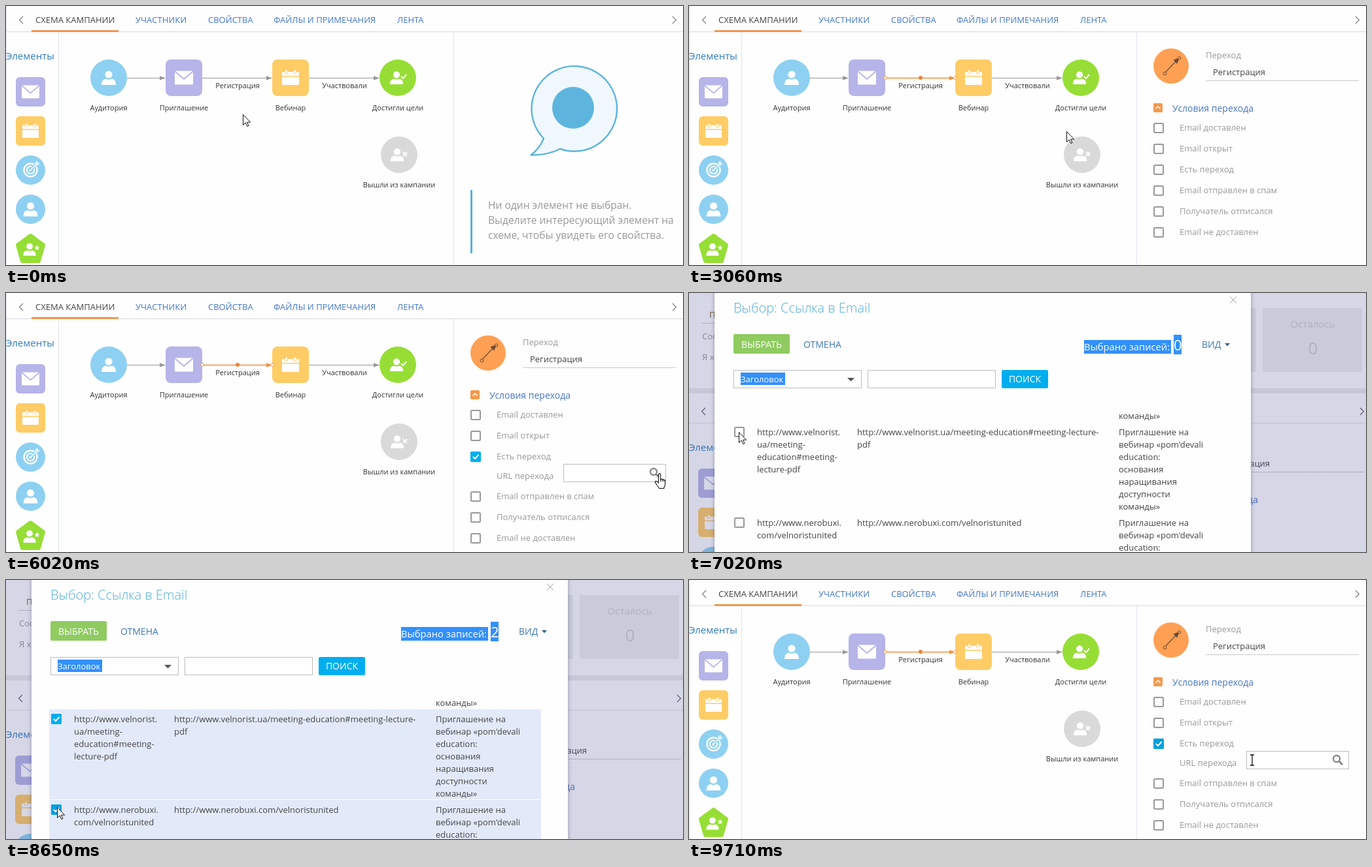
Recreate the animation shown at these times as an HTML page. Size 1035 by 397 pixels, loop 9.78 s.

```html
<!DOCTYPE html>
<html lang="ru">
<head>
<meta charset="utf-8">
<title>Схема кампании</title>
<style>
html, body { margin: 0; width: 100%; height: 100%; overflow: hidden; background: #fefefe; }
svg { display: block; width: 100%; height: 100%; }
text { font-family: "Open Sans", "Noto Sans", sans-serif; white-space: pre; }
</style>
</head>
<body>
<svg id="stage" viewBox="0 0 1035 397"></svg>
<script>
const LOOP = 9780;
const BLUE = '#4377c6', INK = '#444', GREY = '#999', ORANGE = '#f5994b', SKY = '#5db5de';
const PURPLE = '#b6b4e8', YELLOW = '#ffcc66', AQUA = '#8dd0f1', GREEN = '#96de35';

// ---- drawing helpers ----
const text = (x, y, s, size = 13, fill = INK, more = '') =>
  `<text x="${x}" y="${y}" font-size="${size}" fill="${fill}" ${more}>${s}</text>`;
const mid = (x, y, s, size, fill) => text(x, y, s, size, fill, 'text-anchor="middle"');
const lines = (x, y, list) => list.map((s, i) => text(x, y + i * 19, s)).join('');
const rect = (x, y, w, h, fill, r = 0, more = '') =>
  `<rect x="${x}" y="${y}" width="${w}" height="${h}" rx="${r}" fill="${fill}" ${more}/>`;
const disc = (x, y, r, fill, more = '') => `<circle cx="${x}" cy="${y}" r="${r}" fill="${fill}" ${more}/>`;
const path = (d, stroke, w = 1, fill = 'none', more = '') =>
  `<path d="${d}" stroke="${stroke}" stroke-width="${w}" fill="${fill}" ${more}/>`;
const at = (x, y, body, k = 1) => `<g transform="translate(${x} ${y}) scale(${k})">${body}</g>`;
const group = (id, body) => `<g id="${id}">${body}</g>`;
const dots = (x1, x2, y, c) => path(`M${x1} ${y}H${x2}`, c, 1, 'none', 'stroke-dasharray="1 1"');
const field = (x, y, w, h) => rect(x + .5, y + .5, w, h, '#fff', 0, 'stroke="#bdbdbd"');

// ---- icons, centred on 0,0 ----
const mail = c => rect(-14, -10.5, 28, 21, '#fff', 1) + path('M-14-10L0 2L14-10', c, 1.8);
const calendar = c => rect(-13, -9, 26, 6, '#fff', 1) + rect(-13, -1.5, 26, 12.5, '#fff', 1) +
  [-8, 5].map(x => rect(x - .5, -12, 4, 6, '#fff', 1.5, `stroke="${c}"`)).join('');
const person = disc(0, -5, 5.6, '#fff') + path('M-11 11Q-11 2 -4 1.6Q0 4 4 1.6Q11 2 11 11Z', 'none', 0, '#fff');
const target = disc(0, 0, 10, 'none', 'stroke="#fff" stroke-width="2.4"') +
  disc(0, 0, 5.6, 'none', 'stroke="#fff" stroke-width="2"') + disc(0, 0, 2.2, '#fff') +
  path('M0 0L9-9', AQUA, 4) + path('M0 0L9-9M8-8V-12M8-8H12M10-10V-14M10-10H14', '#fff', 1.5);
const star = path('M0-5L1.4-1.6L5-1.4L2.2.9L3.1 4.4L0 2.5L-3.1 4.4L-2.2.9L-5-1.4L-1.4-1.6Z', 'none', 0, '#fff');
const tile = (x, y, size, c, icon, k, r) => rect(x, y, size, size, c, r) + at(x + size / 2, y + size / 2, icon(c), k);
const ball = (x, y, r, c, icon) => disc(x, y, r, c) + at(x, y, icon);

const arrow = (x1, x2, c, w) => path(`M${x1} 110.5H${x2 - 8}`, c, w) +
  path(`M${x2} 110.5L${x2 - 9} 107.3V113.7Z`, 'none', 0, c);
const box = (x, y) => rect(x - 7, y - 7, 14, 14, '#fff', 1.5, `stroke="${GREY}" stroke-width="2"`);
const tick = (id, x, y) => group(id, rect(x - 8, y - 8, 16, 16, 'currentColor', 2) +
  path(`M${x - 4} ${y}L${x - 1} ${y + 3}L${x + 4.5} ${y - 3}`, '#fff', 2));
const option = (y, s) => box(718, y) + text(750, y + 4, s, 13, GREY);

// ---- campaign screen ----
const tabs = [[45, 'СХЕМА КАМПАНИИ', INK], [198, 'УЧАСТНИКИ'], [309, 'СВОЙСТВА'],
  [409, 'ФАЙЛЫ И ПРИМЕЧАНИЯ'], [598, 'ЛЕНТА']];
const labels = [[157, 160, 'Аудитория'], [272, 160, 'Приглашение'], [435, 160, 'Вебинар'],
  [599, 160, 'Достигли цели'], [601, 278, 'Вышли из кампании'], [354, 126, 'Регистрация'], [517.5, 126, 'Участвовали']];

const frame =
  rect(0, 0, 1035, 397, '#fefefe') +
  path('M.5 0V397M80.5 40V397M684.5 40V397', '#dfe3ee') +
  path('M0 39.5H1035', '#d9dae0') + rect(39, 37, 133, 3, '#f0964e') +
  path('M26 16L20.5 21.5L26 27M1019 16L1024.5 21.5L1019 27', '#777', 1.1) +
  tabs.map(([x, s, c = BLUE]) => text(x, 26, s, 13, c)).join('') +
  text(0, 82, 'Элементы', 15, '#2f7cc0') +
  tile(15, 109, 45, PURPLE, mail, .96, 6) + tile(15, 169, 45, YELLOW, calendar, .96, 6) +
  ball(37.5, 251.5, 22.5, AQUA, target) + ball(37.5, 311.5, 22.5, AQUA, person) +
  path('M37.5 352L57 366.5L50 391H25L18 366.5Z', GREEN, 6, GREEN, 'stroke-linejoin="round"') +
  at(36, 373, person, .88) + at(47.5, 370.5, star, .85);

const chart =
  arrow(185, 244, GREY, 1) + arrow(463, 571, GREY, 1) +
  group('linkOff', arrow(300, 407, GREY, 1)) +
  group('linkOn', arrow(300, 407, '#f0913f', 1.6) + disc(354, 110, 3, '#e8843a')) +
  ball(157, 110, 28, AQUA, person) +
  tile(244, 82, 56, PURPLE, mail, 1, 8) + tile(407, 82, 56, YELLOW, calendar, 1, 8) +
  disc(599, 110, 28, GREEN) + at(597, 110, person, .92) + path('M604 108L607 111L612 105', '#fff', 2) +
  disc(601, 228, 28, '#d9d9d9') + at(598, 228, person, .92) + path('M607 224L613 230M613 224L607 230', '#fff', 2) +
  group('ends', [300, 407].map(x => disc(x, 110, 2.3, '#fff', `stroke="${ORANGE}"`)).join('')) +
  labels.map(([x, y, s]) => mid(x, y, s, 11, '#333')).join('');

const hint = group('hint',
  path('M822 203A65.3 65.3 0 1 1 847 219Q828 229 802.5 228.5Q816 218 822 203Z', SKY, 2.4, '#f0f8fe', 'stroke-linejoin="round"') +
  disc(867, 156, 32, SKY) +
  rect(710, 282, 3, 97, '#58b3d6') +
  ['Ни один элемент не выбран.', 'Выделите интересующий элемент на', 'схеме, чтобы увидеть его свойства.']
    .map((s, i) => text(737, 311 + 23 * i, s, 15.6, GREY)).join(''));

const panel = group('panel',
  disc(737, 92, 27, '#ffa054') +
  path('M729 101L745 84M749 80L741.5 83L746 87.5Z', '#6b4a35', 1.1, '#6b4a35') +
  disc(727.5, 103.5, 2.4, '#ffa054', 'stroke="#6b4a35"') + disc(749.5, 80, 2.2, '#ffa054', 'stroke="#6b4a35"') +
  text(790, 80, 'Переход', 13, GREY) + text(801, 106, 'Регистрация') + dots(791, 1024, 114.5, '#999') +
  rect(710, 149, 14, 14, ORANGE, 2) + path('M713.5 157.5L717 154L720.5 157.5', '#fff', 1.5) +
  text(739, 162, 'Условия перехода', 14, '#4a76c4') +
  option(187, 'Email доставлен') + option(219, 'Email открыт') + option(251, 'Есть переход') +
  group('edge', rect(710, 243, 16, 2, '#707070', 1)) + tick('viaTick', 718, 251) +
  group('url', text(750, 285, 'URL перехода', 13, GREY) + field(852, 262, 156, 27) +
    disc(990, 274, 5, 'none', 'stroke="#8a8a8a" stroke-width="2.4"') + path('M994 278L999 283', '#8a8a8a', 3)) +
  group('tail', option(283, 'Email отправлен в спам') + option(315, 'Получатель отписался') + option(347, 'Email не доставлен')));

// ---- link picker over the dimmed page ----
const page =
  rect(0, 0, 1035, 397, '#fff') + rect(0, 146, 1035, 8, '#eaeced') + path('M0 199.5H1035', '#e1e3e5') +
  rect(800, 23, 67, 98, '#eeefed') + rect(877, 23, 152, 98, '#eeefed') +
  mid(953.5, 53, 'Осталось', 15, '#ceced0') + mid(954, 94, '0', 26, '#ceced0') +
  path('M25 176L19.5 181.5L25 187M1026 176L1031.5 181.5L1026 187', '#6b5a70', 1.2) +
  text(31, 38, 'П', 13, '#7f5f20') + dots(20, 40, 46.5, GREY) +
  text(20, 71, 'Сос', 13, GREY) + text(20, 103, 'Я х', 13, GREY) +
  text(0, 242, 'Элементы', 15, '#2f7cc0') +
  tile(14, 269, 45, PURPLE, mail, .96, 6) + tile(14, 329, 45, YELLOW, calendar, .96, 6) +
  disc(36.5, 411.5, 22.5, AQUA) +
  text(808, 266, 'Регистрация') + dots(798, 1031, 274.5, GREY) +
  text(746, 322, 'Условия перехода', 14, '#4a76c4') +
  rect(0, 0, 1035, 397, 'rgba(70,76,140,.22)');

const about = ['Приглашение на', "вебинар «pom'devali", 'education:', 'основания', 'наращивания', 'доступности', 'команды»'];
const site = 'http://www.velnorist.';
const picker = group('picker', page +
  rect(39, -10, 820, 420, '#fefefe', 0, 'style="filter:drop-shadow(0 0 3px rgba(60,65,100,.45))"') +
  text(68, 30, 'Выбор: Ссылка в Email', 20, '#52b0d6', 'font-weight="300"') +
  path('M827 5.5L837 15.5M837 5.5L827 15.5', '#999') +
  group('choose', rect(68, 63, 86, 30, 'currentColor', 2)) + mid(111, 84, 'ВЫБРАТЬ', 14, '#fff') +
  text(175, 84, 'ОТМЕНА', 14, '#3f78b8') +
  rect(604, 72, 133, 21, '#3390fb') + text(604, 88, 'Выбрано записей:', 14.7, '#fff') +
  rect(741, 64, 12, 30, '#3390fb') + text(741, 88, '0', 22, '#fff', 'id="count"') +
  text(784, 84, 'ВИД', 14, '#3f78b8') + path('M819 77H827L823 81.5Z', 'none', 0, '#3c5f86') +
  field(68, 118, 195, 27) + rect(79, 122, 68, 19, '#3390fb') + text(79, 137, 'Заголовок', 13, '#fff') +
  path('M242 130H253L247.5 135.5Z', 'none', 0, '#555') +
  field(273, 118, 195, 27) + rect(478, 118, 71, 28, '#00aeef', 2) + mid(513.5, 137, 'ПОИСК', 14, '#fff') +
  group('row1', rect(66, 198, 752, 138, '#e2eafa')) + group('row2', rect(66, 337, 752, 60, '#e2eafa')) +
  box(77, 213) + box(77, 352) + tick('tick1', 77, 213) + tick('tick2', 77, 352) +
  text(657, 193, about[6]) +
  lines(104, 218, [site, 'ua/meeting-', 'education#meeting-', 'lecture-pdf']) +
  lines(257, 218, [site + 'ua/meeting-education#meeting-lecture-', 'pdf']) +
  lines(657, 218, about) +
  lines(104, 357, ['http://www.nerobuxi.', 'com/velnoristunited']) +
  lines(257, 357, ['http://www.nerobuxi.com/velnoristunited']) +
  lines(657, 357, about.slice(0, 3)));

const pointer = group('cursor',
  group('arrow', path('M.5.5V16.5L4.2 13L6.8 18.6L9 17.6L6.5 12.2H11.6Z', '#111', 1, '#fff')) +
  group('hand', path('M5.5 14V2.5a1.6 1.6 0 0 1 3.2 0V9.5q1.6-1 2.6.4q1.6-.7 2.4.6q2-.3 2 1.6v5.4q0 2-1.8 4.5v1.5h-7.5q-.6-2-2.8-4.5l-3-4.4q-.6-2 1.2-2.2q1.4 0 3.7 2.6z', '#111', 1.1, '#fff') +
    path('M8.7 9.5V13M11.3 10V13M13.7 10.6V13', '#111', 1)) +
  group('beam', path('M-3-8H3M0-8V8M-3 8H3', '#111', 1.3)));

document.getElementById('stage').innerHTML = frame + chart + hint + panel + picker + pointer;

// ---- timeline ----
// start, end, steps, x, y, sideways bow
const moves = [
  [0, 0, 1, 362, 166],
  [210, 830, 9, 358, 112],
  [2530, 3440, 13, 685, 232],
  [3520, 3750, 4, 716, 248],
  [3900, 3900, 1, 717, 250],
  [4770, 5380, 9, 997, 283],
  [5550, 5620, 2, 992, 277],
  [5790, 5790, 1, 992, 276],
  [6100, 6100, 1, 77, 235],
  [6470, 6790, 5, 76, 213],
  [7340, 8110, 11, 77, 360, 8],
  [8260, 8260, 1, 77, 358],
  [8400, 8480, 2, 78, 348],
  [8800, 9560, 11, 108, 76],
  [9710, 9710, 1, 861, 276]
];

function cursorAt(t) {
  let i = moves.length - 1;
  while (moves[i][0] > t) i--;
  const [t0, t1, n, x, y, bow = 0] = moves[i];
  if (!i) return [x, y];
  const k = n > 1 ? Math.min(n, Math.floor((t - t0) / (t1 - t0) * (n - 1) + .001) + 1) : 1;
  const p = k / n, e = p * p * (3 - 2 * p);
  const [, , , px, py] = moves[i - 1];
  return [Math.round(px + (x - px) * e + bow * Math.sin(Math.PI * e)), Math.round(py + (y - py) * e)];
}

const el = id => document.getElementById(id);
const show = (id, on) => { el(id).style.display = on ? '' : 'none'; };
const tint = (id, c) => { el(id).style.color = c; };
const FRESH = '#00a0dc', CALM = '#00aeef';

function draw(t) {
  const [x, y] = cursorAt(t);
  const inPicker = t >= 6100 && t < 9710;
  const linked = t >= 1440, via = t >= 4220;
  show('linkOff', !linked);
  show('linkOn', linked);
  show('ends', linked);
  show('hint', !linked);
  show('panel', t >= 1520);
  show('edge', t >= 4070 && !via);
  show('viaTick', via);
  tint('viaTick', t < 4850 || t >= 9710 ? FRESH : CALM);
  show('url', via);
  el('tail').setAttribute('transform', `translate(0 ${via ? 29 : 0})`);

  show('picker', inPicker);
  el('picker').style.opacity = t < 6170 ? .5 : 1;
  const one = t >= 7110, two = t >= 8650;
  show('row1', one);
  show('tick1', one);
  show('row2', two);
  show('tick2', two);
  tint('tick1', t < 8400 ? FRESH : CALM);
  tint('tick2', t < 8960 ? FRESH : CALM);
  el('count').textContent = one + two;

  const onButton = inPicker && x > 68 && x < 154 && y > 63 && y < 93;
  const inField = via && !inPicker && x > 852 && y > 262 && y < 290;
  const hand = onButton || (inField && x > 980);
  tint('choose', onButton ? '#7fbc50' : '#8fcb61');
  show('hand', hand);
  show('beam', inField && !hand);
  show('arrow', !inField && !hand);
  el('cursor').setAttribute('transform', `translate(${x} ${y})`);
}

const start = performance.now();
function tickFrame() {
  draw((performance.now() - start) % LOOP);
  requestAnimationFrame(tickFrame);
}
tickFrame();
</script>
</body>
</html>
```
